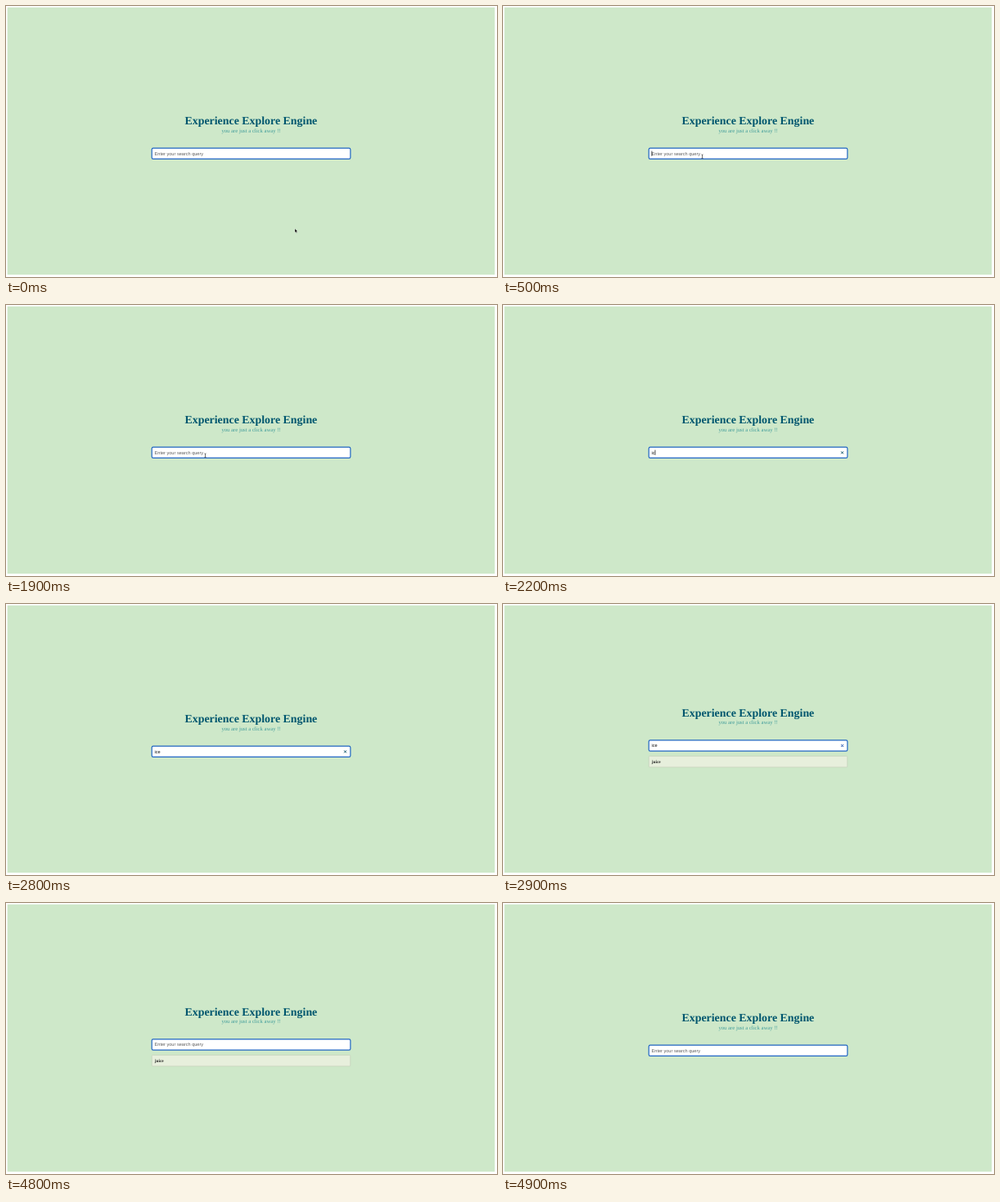
An HTML page that plays this animation: 600 px wide and 332 px high, repeating every 5 s.

```html
<!DOCTYPE html>
<html lang="en">
<head>
<meta charset="utf-8">
<title>Search page</title>
<style>
  html, body { margin: 0; width: 100%; height: 100%; overflow: hidden; background: #fff; }
  svg { display: block; width: 600px; height: 332px; }
  text { text-rendering: geometricPrecision; }
  .serif { font-family: "Liberation Serif", "Times New Roman", serif; }
  .sans { font-family: "Liberation Sans", Arial, sans-serif; font-size: 5.58px; }
</style>
</head>
<body>
<svg viewBox="0 0 600 332">
  <rect x="1.7" y="1.7" width="595.6" height="327.5" fill="#cee8c9"/>
  <g id="page">
    <text class="serif" x="299.4" y="145" text-anchor="middle" font-size="13.9" font-weight="bold" fill="#00566e">Experience Explore Engine</text>
    <text class="serif" x="299.6" y="154.7" text-anchor="middle" font-size="6.7" fill="#409c9a">you are just a click away !!</text>
    <rect x="178.2" y="174.2" width="242.7" height="13.2" rx="1.7" fill="#fff" stroke="#2166c4" stroke-width="1.2"/>
    <text id="query" class="sans" x="181.6" y="182.7"></text>
    <path id="caret" d="M0 177.6v6.2" stroke="#000" stroke-width=".7"/>
    <path id="clear" d="M413.2 179.4l2.7 2.9m0-2.9l-2.7 2.9" stroke-width="1"/>
    <g id="result">
      <rect x="178.2" y="193.6" width="242.6" height="13.6" rx="1" fill="#e7efdc" stroke="#c3cfb9" stroke-width=".7"/>
      <text class="serif" x="181.8" y="202.6" font-size="5.3" font-weight="bold" fill="#222">juice</text>
    </g>
  </g>
  <path id="arrow" d="M0 0v4.7l1.1-1 .8 1.8.8-.4-.8-1.7h1.5z" fill="#000" stroke="#fff" stroke-width=".35"/>
  <path id="beam" d="M-1-2.4q1 0 1 .6v3.6q0 .6-1 .6M1-2.4q-1 0-1 .6m0 3.6q0 .6 1 .6" fill="none" stroke="#222" stroke-width=".65"/>
</svg>
<script>
const LOOP = 5000;
const el = id => document.getElementById(id);
const [page, query, caret, clear, result, arrow, beam] =
  ["page", "query", "caret", "clear", "result", "arrow", "beam"].map(el);

// Each track lists [start time, value]; values hold until the next entry.
const typed = [[0, ""], [2000, "i"], [2200, "ic"], [2300, "ice"], [4100, "ic"], [4200, "i"], [4300, ""]];
const caretOn = [[0, false], [500, true], [1000, false], [1400, true], [1900, false], [2000, true],
  [2800, false], [3300, true], [3800, false], [4100, true], [4800, false]];
const pointer = [[0, [353, 272.8]], [100, [343, 263.5]], [300, [322, 248]], [400, [272, 206]], [500, [243.5, 184.3]]];

const at = (track, t) => track.findLast(([start]) => start <= t)[1];
const show = (node, visible) => node.setAttribute("visibility", visible ? "visible" : "hidden");
const move = (node, x, y) => node.setAttribute("transform", `translate(${x} ${y})`);

function draw(t) {
  const text = at(typed, t);
  const found = t >= 2900 && t < 4900;

  move(page, 0, found ? -7.3 : 0);
  show(result, found);

  query.textContent = text || "Enter your search query";
  query.setAttribute("fill", text ? "#111" : "#5c5c5c");
  move(caret, 181.9 + (text ? query.getComputedTextLength() : 0), 0);
  show(caret, at(caretOn, t));
  show(clear, text !== "");
  clear.setAttribute("stroke", found ? "#1b4fae" : "#0d5368");

  const [x, y] = at(pointer, t);
  move(arrow, x, y);
  move(beam, x, y);
  show(arrow, t < 500);
  show(beam, t >= 500 && t < 2000);
}

const began = performance.now();
function frame() {
  draw((performance.now() - began) % LOOP);
  requestAnimationFrame(frame);
}
frame();
</script>
</body>
</html>
```
